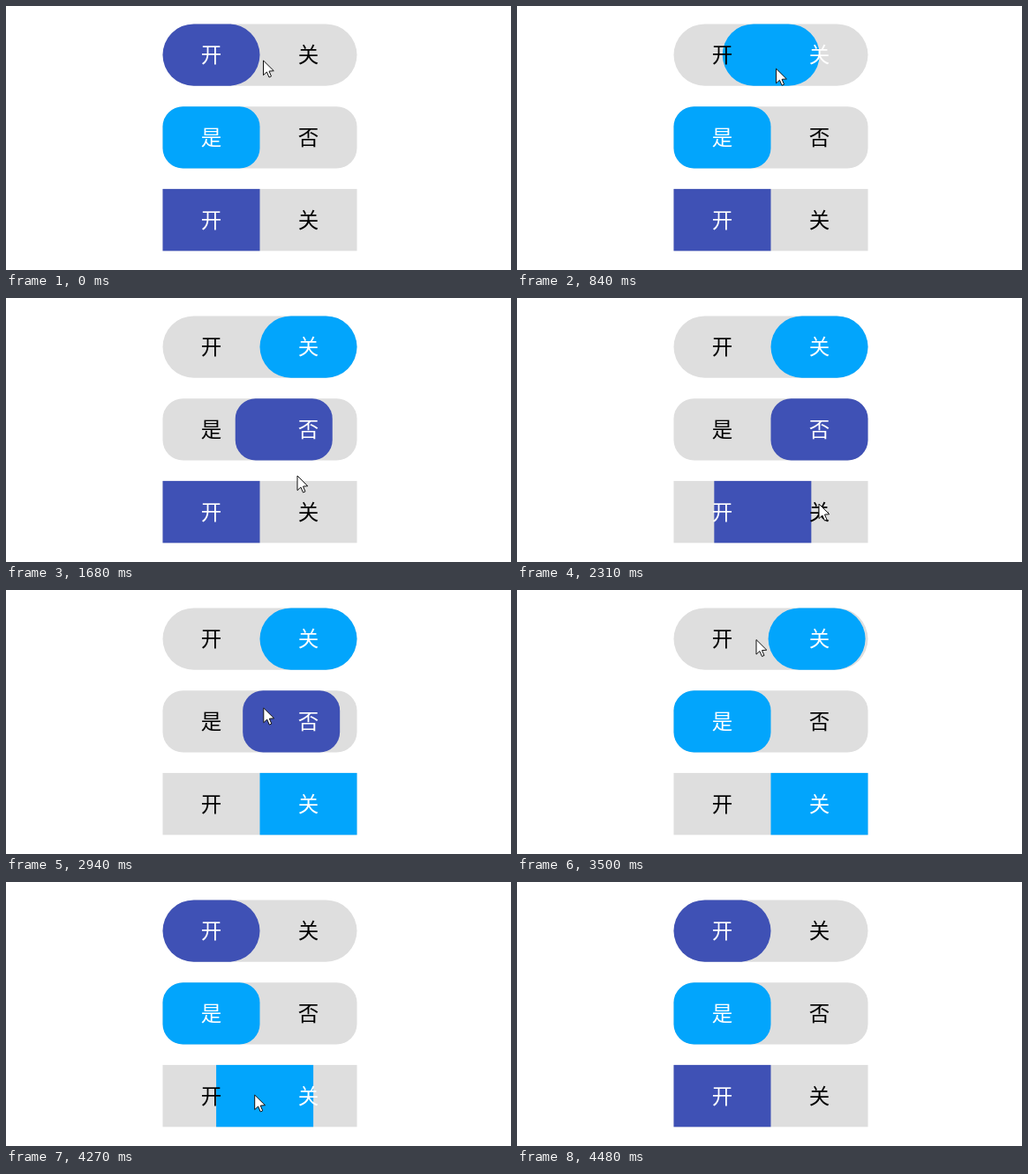
An HTML page for the animation above (7140 ms loop, 572 by 300 pixels).

```html
<!DOCTYPE html>
<html lang="zh-CN">
<head>
<meta charset="utf-8">
<title>Toggle switches</title>
<style>
  html, body { margin: 0; width: 100%; height: 100%; overflow: hidden; background: #fff; }
  svg { display: block; width: 572px; height: 300px; }
  text {
    font: 23.5px "Noto Sans CJK SC", "Noto Sans CJK", sans-serif;
    text-anchor: middle;
  }
</style>
</head>
<body>
<svg id="stage" viewBox="0 0 572 300"></svg>
<script>
const LOOP = 7140, TICK = 70, SLIDE = 385, GLIDE = 350;
const LEFT = 177.5, TOP = 20.4, PITCH = 93.75, HALF = 110, HEIGHT = 70.4;
const INDIGO = '#3f51b5', BLUE = '#02a5fc', TRACK = '#dedede';

const switches = [
  { labels: ['开', '关'], colors: [INDIGO, BLUE], radius: HEIGHT / 2 },
  { labels: ['是', '否'], colors: [BLUE, INDIGO], radius: 23 },
  { labels: ['开', '关'], colors: [INDIGO, BLUE], radius: 0 }
];

// The pointer rests at x, y, clicks a switch, then leaves for the next visit.
const visits = [
  { row: 0, x: 291.5, y: 62, click: 647, leave: 805 },
  { row: 1, x: 312, y: 154, click: 1424, leave: 1470 },
  { row: 2, x: 342, y: 234, click: 2138, leave: 2310 },
  { row: 1, x: 297, y: 153.5, click: 2834, leave: 2870 },
  { row: 0, x: 271, y: 56.5, click: 3460, leave: 3500 },
  { row: 2, x: 279.5, y: 220, click: 4090, leave: 4130 }
];
const exit = { x: 285, y: 275 };

const stage = document.getElementById('stage');

function add(tag, attrs, text) {
  const el = document.createElementNS('http://www.w3.org/2000/svg', tag);
  for (const key in attrs) el.setAttribute(key, attrs[key]);
  if (text) el.textContent = text;
  return stage.appendChild(el);
}

switches.forEach((s, i) => {
  const y = TOP + i * PITCH;
  const box = { x: LEFT, y, height: HEIGHT, rx: s.radius };
  add('rect', { ...box, width: HALF * 2, fill: TRACK });
  s.thumb = add('rect', { ...box, width: HALF });
  s.texts = s.labels.map((label, n) =>
    add('text', { x: LEFT + HALF * (n + 0.5), y: y + HEIGHT / 2 + 8.4 }, label));
  s.clicks = visits.filter(v => v.row === i).map(v => v.click);
});

const pointer = add('path', {
  d: 'M0 0V16.6L3.9 13L6.5 19L9 17.9L6.5 12.1L11.8 11.7Z',
  fill: '#fff', stroke: '#111', 'stroke-width': 1, 'stroke-linejoin': 'round'
});

const progress = (t, start, length) => Math.min(1, Math.max(0, (t - start) / length));
const swing = p => 0.5 - Math.cos(p * Math.PI) / 2;

function drawSwitch(s, t) {
  const [off, on] = s.clicks.map(c => swing(progress(t, c, SLIDE)));
  const pos = off - on;
  const side = pos >= 0.5 ? 1 : 0;
  s.thumb.setAttribute('x', LEFT + HALF * pos);
  s.thumb.setAttribute('fill', s.colors[side]);
  s.texts.forEach((el, n) => el.setAttribute('fill', n === side ? '#fff' : '#000'));
}

function drawPointer(t) {
  let { x, y } = visits[0];
  visits.forEach((v, i) => {
    const next = visits[i + 1] || exit;
    const p = progress(t, v.leave, GLIDE);
    x += (next.x - v.x) * p;
    y += (next.y - v.y) * p;
  });
  const gone = t >= visits[visits.length - 1].leave + GLIDE;
  pointer.setAttribute('visibility', gone ? 'hidden' : 'visible');
  pointer.setAttribute('transform', `translate(${x} ${y})`);
}

const begin = performance.now();
function frame() {
  const elapsed = (performance.now() - begin) % LOOP;
  const t = Math.floor(elapsed / TICK) * TICK;
  switches.forEach(s => drawSwitch(s, t));
  drawPointer(t);
  requestAnimationFrame(frame);
}
frame();
</script>
</body>
</html>
```
